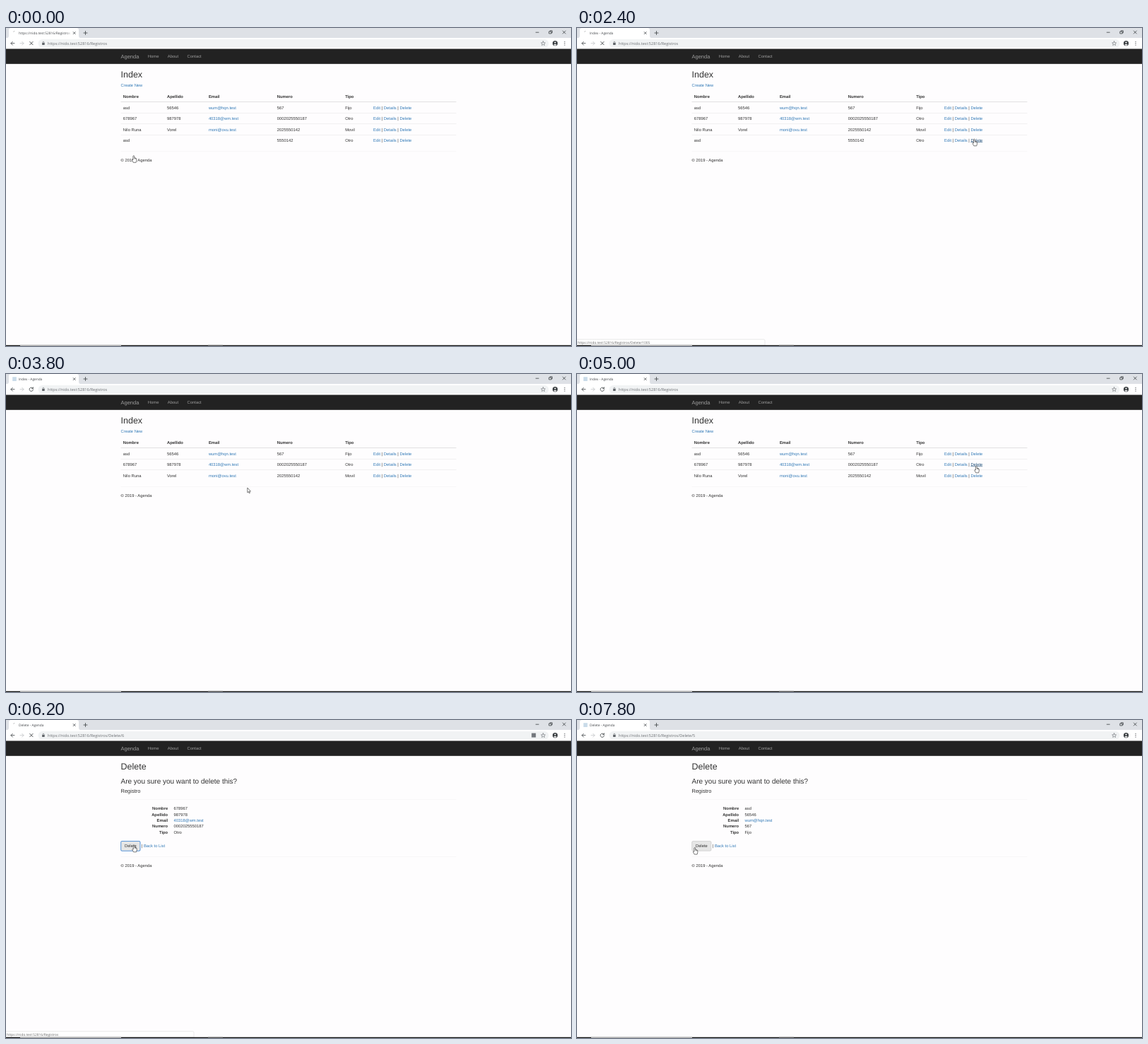
An HTML page that plays this animation: 800 by 450 pixels, repeating every 8 s.

```html
<!DOCTYPE html>
<html lang="es">
<head>
<meta charset="utf-8">
<title>Agenda</title>
<style>
html, body { margin: 0; width: 100%; height: 100%; overflow: hidden; background: #fefdfe; }
svg { display: block; width: 800px; height: 450px; }
text { text-rendering: geometricPrecision; white-space: pre; }
.ui { font-family: "Open Sans", "Noto Sans", sans-serif; }
.page { font: 14px "Liberation Sans", Arial, sans-serif; fill: #333; }
.link { fill: #337ab7; }
.hover { fill: #23527c; text-decoration: underline; }
.line { fill: none; stroke-linecap: round; stroke-linejoin: round; }
</style>
</head>
<body>
<svg viewBox="0 0 800 450" xmlns="http://www.w3.org/2000/svg">
  <defs>
    <linearGradient id="fade"><stop stop-color="#fff" stop-opacity="0"/><stop offset="1" stop-color="#fff"/></linearGradient>
    <filter id="shadow" x="-10%" y="-20%" width="120%" height="150%">
      <feDropShadow dx="0" dy=".8" stdDeviation="1.1" flood-opacity=".4"/>
    </filter>
  </defs>
  <rect width="800" height="450" fill="#fefdfe"/>
  <g class="page" transform="scale(.4166667)">
    <rect y="70" width="1920" height="52" fill="#222"/>
    <g fill="#9d9d9d">
      <text x="390" y="102.5" font-size="18">Agenda</text>
      <text x="482" y="101.5">Home</text>
      <text x="549.3" y="101.5">About</text>
      <text x="615.9" y="101.5">Contact</text>
    </g>
    <g id="page"></g>
  </g>
  <g class="ui">
    <rect width="800" height="14.2" fill="#dee1e6"/>
    <rect y="14" width="800" height="15.4" fill="#fff"/>
    <path d="M1 14.2Q4 14 4 11V3Q4 0 7 0H100Q103 0 103 3V11Q103 14 106 14.2Z" fill="#fff"/>
    <rect x="45.5" y="16" width="723" height="11.6" rx="5.8" fill="#f1f3f4"/>
    <g class="line" stroke="#3c4043" stroke-width=".8">
      <path d="M95.2 5.6l3 3m0-3l-3 3M110 7h5m-2.5-2.5v5"/>
      <path d="M750.2 6.2h4M788.3 4l4 4m0-4l-4 4M769.2 4.9h3v3h-3zM770.3 4.8v-1h3v3h-1"/>
      <path d="M12 21.7H7m2.3-2.4L7 21.7l2.3 2.4"/>
      <path d="M20 21.7h5m-2.3-2.4l2.3 2.4-2.3 2.4" stroke="#c1c3c6"/>
      <path d="M760.6 18.8l.9 2 2.1.2-1.6 1.4.5 2.1-1.9-1.1-1.9 1.1.5-2.1-1.6-1.4 2.1-.2z" stroke="#5f6368" stroke-width=".6"/>
      <path d="M51.9 21.2v-.9q0-1.1 1-1.1t1 1.1v.9" stroke="#5f6368" stroke-width=".6"/>
    </g>
    <rect x="51.1" y="21" width="3.6" height="3" rx=".4" fill="#5f6368"/>
    <circle cx="777.5" cy="21.7" r="3.6" fill="#3c4043"/>
    <circle cx="777.5" cy="20.5" r="1.1" fill="#fff"/>
    <path d="M775.3 23.7q2.2-2 4.4 0q-2.2 2-4.4 0z" fill="#fff"/>
    <g fill="#4a4d51"><circle cx="791" cy="19.3" r=".65"/><circle cx="791" cy="21.7" r=".65"/><circle cx="791" cy="24.1" r=".65"/></g>
    <g id="chrome"></g>
    <rect y="448.8" width="800" height="1.2" fill="#111"/>
    <rect x="20" y="448.8" width="143" height="1.2" fill="#b4b4b4"/>
    <rect x="286" y="448.8" width="21" height="1.2" fill="#555"/>
  </g>
  <g id="cursor" stroke="#222" stroke-width=".6" stroke-linejoin="round" fill="#fff"></g>
</svg>
<script>
const el = id => document.getElementById(id);
const base = 'https://nido.test:52816/Registros';
const records = [
  ['asd', '56546', 'wum@hqn.test', '567', 'Fijo'],
  ['678967', '987978', '40318@wm.test', '0002025550187', 'Otro'],
  ['Nilo Runa', 'Vorel', 'moni@ovu.test', '2025550142', 'Movil'],
  ['asd', '', '', '5550142', 'Otro']
];
const ids = [5, 6, 7, 1005];
const heads = ['Nombre', 'Apellido', 'Email', 'Numero', 'Tipo'];
const cols = [398, 547, 688.5, 921, 1152.5];

// State changes: time in ms, then what becomes different.
const events = [
  [0, { rows: [0, 1, 2, 3], rec: null, title: 'url', load: 1, tip: '', icon: 0, popup: 0, hover: null, focus: 0 }],
  [100, { title: 'Index - Agenda', load: 0 }],
  [1700, { hover: 3 }],
  [2100, { tip: '/Delete/1005' }],
  [2300, { load: 1 }],
  [2500, { rec: 3, title: 'url', hover: null }],
  [2600, { title: 'Delete - Agenda', load: 0 }],
  [2800, { tip: '', icon: 1, popup: 1 }],
  [3000, { hover: 'btn' }],
  [3200, { load: 1, focus: 1, popup: 0 }],
  [3300, { rec: null, rows: [0, 1, 2], title: 'url', icon: 0, hover: null, focus: 0 }],
  [3400, { title: 'Index - Agenda', load: 0 }],
  [4900, { hover: 1 }],
  [5100, { tip: '/Delete/6' }],
  [5300, { load: 1 }],
  [5400, { rec: 1, title: 'url', hover: null }],
  [5500, { title: 'Delete - Agenda', load: 0 }],
  [5700, { tip: '', icon: 1, popup: 1 }],
  [5900, { hover: 'back' }],
  [6000, { tip: ' ' }],
  [6100, { hover: 'btn' }],
  [6200, { load: 1, focus: 1, popup: 0 }],
  [6300, { rec: null, rows: [0, 2], title: 'url', icon: 0, tip: '', hover: null, focus: 0 }],
  [6400, { title: 'Index - Agenda', load: 0 }],
  [6800, { hover: 0 }],
  [6900, { tip: '/Delete/5', load: 1 }],
  [7100, { rec: 0, title: 'url', hover: null }],
  [7300, { title: 'Delete - Agenda', load: 0 }],
  [7500, { tip: '' }],
  [7800, { hover: 'btn' }]
];

// Pointer: time, x, y, and whether it is a hand on the way to this point.
const path = [
  [0, 180.8, 180.5, 1], [300, 180.8, 180.5, 1], [700, 182.3, 183.3, 0], [800, 182.3, 183.3, 0],
  [1500, 556.8, 155, 0], [1600, 556.8, 155, 0], [1700, 563.2, 156, 1], [1900, 562.5, 157, 1],
  [2400, 562.5, 157, 1], [2900, 190.5, 186, 0], [3000, 175.8, 177, 1], [3500, 175.8, 177, 1],
  [3900, 372.6, 158, 0], [4100, 372.6, 158, 0], [4800, 567, 122.5, 0], [5000, 565.3, 130, 1],
  [5400, 565.3, 130, 1], [5800, 228, 180, 0], [5900, 212, 176, 1], [6100, 188, 177, 1],
  [6200, 181.2, 177, 1], [6300, 181.2, 177, 1], [6700, 555, 117, 0], [6800, 565, 111, 1],
  [7000, 565, 111, 1], [7100, 560, 111, 0], [7200, 560, 111, 0], [7700, 155, 183, 0],
  [7800, 166.8, 180.3, 1], [8000, 166.8, 180.3, 1]
];

const text = (x, y, s, attrs = '') => `<text x="${x}" y="${y}" ${attrs}>${s}</text>`;
const rect = (x, y, w, h, attrs) => `<rect x="${x}" y="${y}" width="${w}" height="${h}" ${attrs}/>`;
const rule = (y, color = '#eee', h = 1) => rect(390, y, 1140, h, `fill="${color}"`);
const span = (s, over) => `<tspan class="${over ? 'hover' : 'link'}">${s}</tspan>`;
const stroke = (d, w, color) => `<path class="line" d="${d}" stroke="${color}" stroke-width="${w}"/>`;
const footer = y => rule(y) + text(390, y + 35.5, '© 2019 - Agenda');

function indexPage(s) {
  let out = text(390, 167.7, 'Index', 'font-size="30"') + text(390, 198.6, 'Create New', 'class="link"');
  heads.forEach((h, i) => out += text(cols[i], 236.8, h, 'font-weight="700"'));
  out += rule(250, '#ddd', 2);
  s.rows.forEach((r, i) => {
    const y = 275.3 + 37 * i;
    if (i) out += rule(y - 24, '#ddd');
    records[r].forEach((v, c) => out += text(cols[c], y, v, c === 2 ? 'class="link"' : ''));
    out += text(1248, y, `${span('Edit')} | ${span('Details')} | ${span('Delete', s.hover === r)}`);
  });
  return out + footer(271 + 37 * s.rows.length);
}

function deletePage(s) {
  const over = s.hover === 'btn';
  const edge = s.focus ? '#5c97d8' : over ? '#adadad' : '#ccc';
  let out = text(390, 167.7, 'Delete', 'font-size="30"')
    + text(390, 215.1, 'Are you sure you want to delete this?', 'font-size="24"')
    + text(390, 246.2, 'Registro', 'font-size="18"') + rule(269);
  heads.forEach((h, i) => {
    const y = 305.5 + 20 * i;
    out += text(550, y, h, 'font-weight="700" text-anchor="end"')
      + text(570, y, records[s.rec][i], i === 2 ? 'class="link"' : '');
  });
  return out
    + rect(390.5, 411.5, 65.5, 33, `rx="4" fill="${over ? '#e6e6e6' : '#fff'}" stroke="${edge}" stroke-width="${s.focus ? 2.5 : 1}"`)
    + text(403, 432.8, 'Delete')
    + text(460.4, 431.5, `| ${span('Back to List', s.hover === 'back')}`)
    + footer(464.5);
}

function popup() {
  return rect(639, 28.3, 129, 45.2, 'rx="1" fill="#fff" filter="url(#shadow)"')
    + stroke('M759.2 32.8l3.6 3.6m0-3.6l-3.6 3.6', .7, '#555')
    + text(645.6, 42, '¿Deseas traducir esta página?', 'font-size="5.9" fill="#333"')
    + rect(685.5, 54, 31.5, 13, 'rx="1" fill="#4285f4"')
    + text(701.2, 62, 'Traducir', 'font-size="4.5" font-weight="600" fill="#fff" text-anchor="middle"')
    + rect(720.7, 54.2, 40.2, 12.6, 'rx="1" fill="#fff" stroke="#c8c8c8" stroke-width=".5"')
    + text(727, 62, 'Opciones', 'font-size="4.9" fill="#666"')
    + '<path d="M752.2 59.4h3.8l-1.9 2.2z" fill="#666"/>';
}

function chrome(s) {
  const url = base + (s.rec === null ? '' : '/Delete/' + ids[s.rec]);
  let out = text(18, 8.9, s.title === 'url' ? url.slice(0, 33) : s.title, 'font-size="4.8" fill="#45484c"')
    + rect(86, 2, 6.5, 10, 'fill="url(#fade)"')
    + text(59, 23.7, url, 'font-size="5.52" fill="#6b6e72"');
  out += s.load
    ? stroke('M10.6 5.1q.6-.5 1.3-.5', .6, '#8a8d91')
      + stroke('M33.7 19.4l4.4 4.4m0-4.4l-4.4 4.4', .9, '#3c4043')
    : rect(9.2, 4.2, 5.6, 5.8, 'fill="#c9dbe9"')
      + stroke('M38 20.1A2.7 2.7 0 1 0 38.5 22.2M38.4 18.8v1.9h-1.9', .8, '#3c4043');
  if (s.icon) {
    if (s.popup) out += '<circle cx="747.2" cy="21.6" r="5.3" fill="#d4d6d9"/>';
    out += rect(744.2, 18.6, 6, 6, 'fill="#73777c"');
  }
  if (s.popup) out += popup();
  if (s.tip) {
    out += `<path d="M-1 440.5H264Q266 440.5 266 442.5V449H-1Z" fill="#fff" stroke="#d6d6d6" stroke-width=".5"/>`
      + text(1, 446.8, base + s.tip.trim(), 'font-size="4.8" fill="#666"');
  }
  return out;
}

const hand = '<path d="M-.9.7Q0-.6.9.7V3.2Q4 3.3 4 5V7.2L3.3 9.8H-.6L-2.4 6.4Q-2.2 4.8-.9 6Z"/>'
  + '<path d="M1 3.2v1.8M2.2 3.5v1.6M3.2 3.8v1.4" stroke-width=".4"/>';
const arrow = '<path d="M0 0V6.8L1.5 5.5 2.5 7.8 3.6 7.3 2.6 5.1H4.6Z"/>';

function drawCursor(t) {
  const i = Math.max(1, path.findIndex(k => k[0] >= t));
  const [t0, x0, y0] = path[i - 1], [t1, x1, y1, isHand] = path[i];
  const p = (t - t0) / (t1 - t0), e = p * p * (3 - 2 * p);
  el('cursor').setAttribute('transform', `translate(${x0 + (x1 - x0) * e} ${y0 + (y1 - y0) * e})`);
  el('cursor').innerHTML = isHand ? hand : arrow;
}

function draw(t) {
  const s = Object.assign({}, ...events.filter(e => e[0] <= t).map(e => e[1]));
  el('page').innerHTML = s.rec === null ? indexPage(s) : deletePage(s);
  el('chrome').innerHTML = chrome(s);
  drawCursor(t);
}

let last = -1;
function tick(now) {
  const step = Math.floor((now % 8000) / 100);
  if (step !== last) draw((last = step) * 100);
  requestAnimationFrame(tick);
}
tick(performance.now());
</script>
</body>
</html>
```
